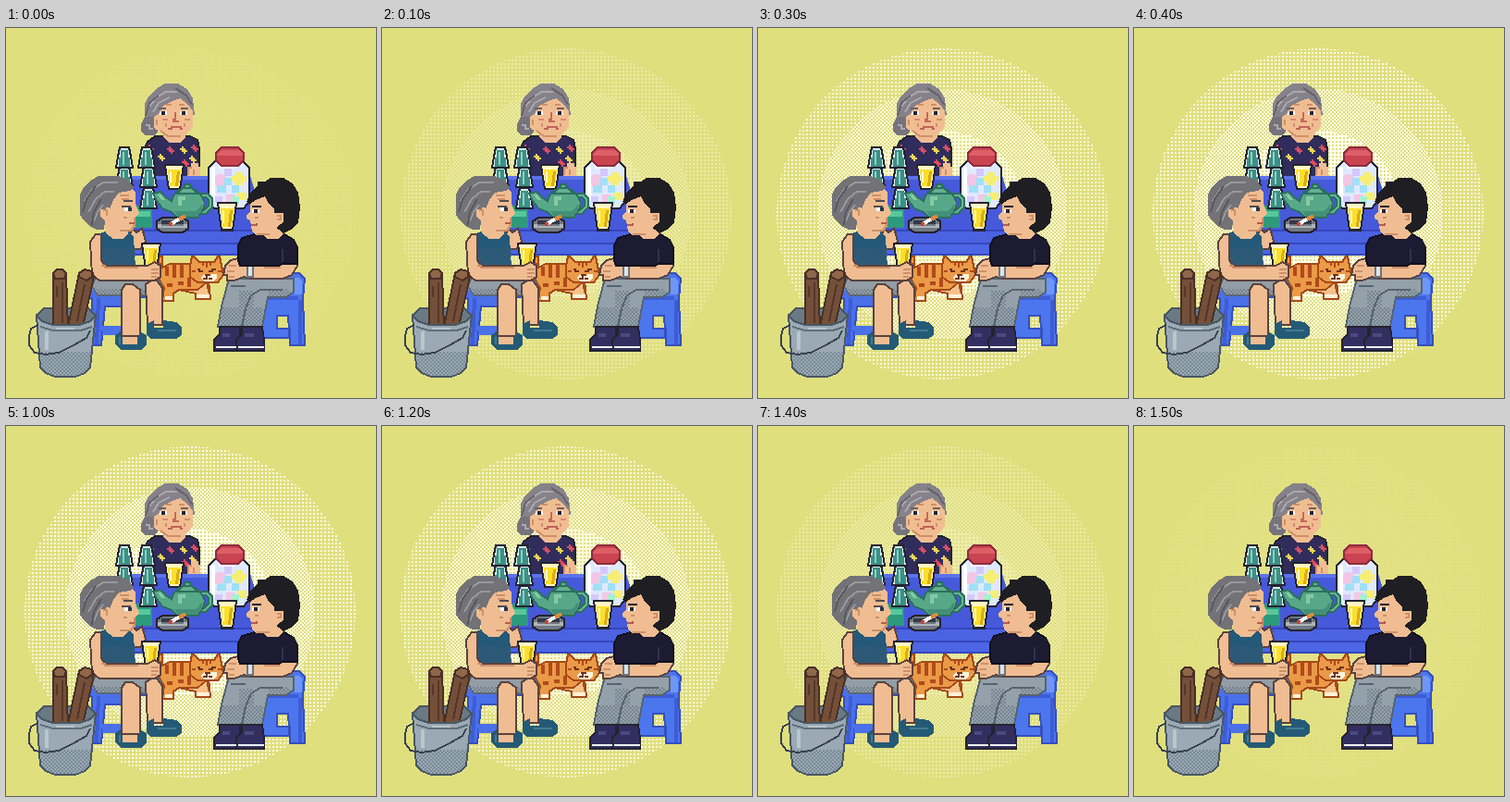
An HTML page without scripts for the animation above (1.6 s loop, 400 by 400 pixels).

```html
<!DOCTYPE html>
<html lang="en">
<head>
<meta charset="utf-8">
<title>Afternoon at the tea table</title>
<style>
html,body{margin:0;width:100%;height:100%;overflow:hidden;background:#e0df7e}
svg{display:block;width:100vw;height:100vh;shape-rendering:crispEdges}
.o{stroke:#25232f;stroke-width:2}
.l{fill:none;stroke-width:2}
.skin{fill:#f0bd92}
.limb{stroke:#5a4340;stroke-width:2}
.shade{stroke:#cf9069}
.glow{animation:glow 1.6s step-end infinite}
.nod{animation:nod 1.6s step-end infinite}
@keyframes glow{
0%{opacity:.1}6.25%{opacity:.4}12.5%{opacity:.7}18.75%{opacity:.85}
25%{opacity:1}75%{opacity:.85}81.25%{opacity:.7}87.5%{opacity:.4}93.75%,100%{opacity:.1}}
@keyframes nod{0%{transform:translateY(0)}62.5%,100%{transform:translateY(2px)}}
</style>
</head>
<body>
<svg viewBox="0 0 400 400">
<defs>
<pattern id="sparse" width="4" height="4" patternUnits="userSpaceOnUse"><path fill="#fffeea" d="M0 2h2v2h-2z"/></pattern>
<pattern id="check" width="4" height="4" patternUnits="userSpaceOnUse"><path fill="#fffeea" d="M0 2h2v2h-2zM2 0h2v2h-2z"/></pattern>
<pattern id="dense" width="4" height="4" patternUnits="userSpaceOnUse"><path fill="#fffeea" d="M0 0h4v2h-2v2h-2z"/></pattern>
<pattern id="dark" width="4" height="4" patternUnits="userSpaceOnUse"><path fill="#4b5c6c" fill-opacity=".4" d="M0 0h2v2h-2zM2 2h2v2h-2z"/></pattern>
<g id="beer">
  <path class="o" fill="#fff6c4" d="M1 1H21L19 15L17 27H5L3 15Z"/>
  <path fill="#fae02c" d="M4 6H18L16 24H6Z"/>
  <path fill="#dcab16" d="M14 8h3l-2 16h-3z"/>
  <path fill="#fff9c9" d="M6 8h2v12h-2z"/>
</g>
<g id="glass">
  <path class="o" fill="#d8f0ec" d="M5 1H15L17 11L19 23H1L3 11Z"/>
  <path fill="#3c8f85" d="M6 4h8v8h2v10h-12v-10h2z"/>
  <path fill="#8ccfc2" d="M8 6h2v14h-2z"/>
</g>
<path id="flower" d="M-2-4h2v2h2v2h2v2h-2v2h-2v-2h-2v-2h-2v-2h2z"/>
</defs>

<rect width="400" height="400" fill="#e0df7e"/>
<g class="glow">
  <circle cx="199" cy="201" r="179" fill="url(#sparse)"/>
  <circle cx="199" cy="201" r="135" fill="url(#check)"/>
  <circle cx="199" cy="201" r="90" fill="url(#dense)"/>
</g>

<!-- grandmother -->
<g class="nod">
  <path class="o" fill="#302d5c" d="M149 163V131L153 123L161 117H199L207 121L209 131V163Z"/>
  <path class="skin" d="M170 110h24v8l-6 6h-12l-6-6z"/>
  <g fill="#e04c62"><use href="#flower" x="178" y="132"/><use href="#flower" x="204" y="130"/><use href="#flower" x="156" y="130"/><use href="#flower" x="194" y="146"/></g>
  <g fill="#f2d45c"><use href="#flower" x="168" y="140"/><use href="#flower" x="192" y="132"/><use href="#flower" x="202" y="142"/></g>
  <path fill="#85828a" d="M150 100V82L154 74L162 66L172 60H186L196 66L202 76L204 94L165 104Z"/>
  <path fill="#76737c" d="M146 104L150 96H158L164 100V112L160 116H150L146 112Z"/>
  <path class="l" stroke="#aaa7ae" d="M155 85L163 75 173 69H185M159 91L165 81 177 75M151 105h4v4h4"/>
  <path class="l" stroke="#66636c" d="M151 95L155 81 165 73M183 65L195 73 201 83"/>
  <path class="skin" d="M160 96L166 92 170 84 182 78 188 76 196 82 202 90V106L198 112L190 118H174L166 112L160 108Z"/>
  <path class="l shade" d="M163 99v6M189 117H175L167 111M173 83h6M187 83h6"/>
  <path fill="#fff" d="M166 90h8v4h-8zM188 90h8v4h-8z"/>
  <path fill="#25232f" d="M168 90h4v4h-4zM190 90h4v4h-4z"/>
  <path class="l" stroke="#6d625f" d="M165 87h8M189 87h8"/>
  <path class="l" stroke="#c66a55" d="M183 91v8h-2v2h6"/>
  <path class="l" stroke="#dd8b70" d="M169 99h6M193 99h6M173 103v4M193 103v4"/>
  <path class="l" stroke="#c2605a" d="M175 109H179V107H189V109H191"/>
</g>

<!-- table -->
<path fill="#4659db" d="M128 160H264L284 220H128Z"/>
<path fill="#5b73ec" d="M128 160H264L266 164H128Z"/>
<path fill="#4b62e1" d="M124 220H286V232H124Z"/>
<path fill="#4c66e4" d="M136 232H270V246H136Z"/>
<path class="l" stroke="#3346bc" d="M128 219H284M136 233H270M136 245H262"/>
<path class="skin" d="M196 150h4v-4h8v4h2v10h-14z"/>
<path class="l shade" d="M197 159v-8h4M203 153v6"/>

<!-- glasses and tray -->
<path fill="#2d9a7c" d="M134 192H158V216H134Z"/>
<path fill="#58c79b" d="M138 198H156V204H138Z"/>
<use href="#glass" x="118" y="172"/><use href="#glass" x="144" y="172"/>
<use href="#glass" x="118" y="149"/><use href="#glass" x="144" y="149"/>
<use href="#glass" x="118" y="128"/><use href="#glass" x="142" y="128"/>
<use href="#beer" x="171" y="147"/>

<!-- jar -->
<path class="o" fill="#dfe9ff" d="M227 143H255L263 151V187L257 195H225L219 187V151Z"/>
<g>
  <path fill="#f4c6e6" d="M224 162l4-4h6l4 4v6l-4 4h-6l-4-4zM238 180h10v8h-10z"/>
  <path fill="#f7ee74" d="M248 156h8v4h4v6h-4v4h-8v-4h-4v-6h4zM250 178h10v8h-10z"/>
  <path fill="#a0e0f6" d="M236 162h8v8h-8zM228 172l4-2h6v8h-10zM244 170h8v8h-8z"/>
  <path fill="#a8efd0" d="M244 182h8v8h-8z"/>
  <path fill="#d3c8fa" d="M236 152h8v8h-8zM226 182h8v6h-8z"/>
  <path fill="#fff" d="M222 150h4v36h-4zM230 148h18v4h-18z"/>
</g>
<path fill="#c94450" stroke="#8e2b40" stroke-width="2" d="M233 129H251L257 135V143L251 149H233L227 143V135Z"/>
<path fill="#dd5f66" d="M232 132h20l4 4v2h-28v-2z"/>

<!-- teapot -->
<path class="l" stroke="#2c6f60" style="stroke-width:6" d="M209 181h8l4 4v8l-6 6h-6"/>
<path class="l" stroke="#65b591" d="M209 181h8l4 4v8l-6 6h-6"/>
<path fill="#57a888" stroke="#2c6f60" stroke-width="2" d="M159 179L167 177L173 183L179 187L181 181L187 175H205L211 181L215 189L213 197L207 205H185L179 199L169 195L163 187Z"/>
<path fill="#86caa4" d="M186 182h8v4h-4v6h-4zM164 180h4l4 6h-4z"/>
<path fill="#438f78" d="M182 198h24l6-8v6l-6 8h-20z"/>
<path fill="#64b08f" stroke="#2c6f60" stroke-width="2" d="M185 179L191 173H201L207 179ZM193 173v-4h6v4z"/>

<!-- ashtray -->
<path class="o" fill="#717983" d="M163 209L169 205H191L197 209V217L191 221H169L163 217Z"/>
<path fill="#353946" d="M168 208h24v4h-24z"/>
<path fill="#adb4ba" d="M164 212h4v2h24v-2h4v4h-32z"/>
<path class="l" stroke="#fff" style="stroke-width:4" d="M178 212L188 206"/>
<path class="l" stroke="#e48a3a" style="stroke-width:4" d="M187 207L194 203"/>
<path fill="#c9442f" d="M176 210h4v4h-4z"/>
<use href="#beer" transform="translate(228 188) scale(1 1.13)"/>

<!-- cat -->
<g fill="#eb9a48" stroke="#a54a18" stroke-width="2">
  <path d="M165 265V247H169V259L177 255H203L219 273L221 293H209V283H187L181 287V295H169L171 281 167 275Z"/>
  <path fill="#f5c28a" d="M187 283H207L217 275 221 293H205V287Z"/>
  <path d="M199 269V257L201 247H203L209 253H225L229 247H231L233 257 235 267 229 275H207Z"/>
</g>
<path fill="#fff3d9" d="M214 266h14v4l-4 4h-10l-4-4zM172 290h8v4h-8zM206 288h14v4h-14z"/>
<path class="l" stroke="#b04a1a" style="stroke-width:4" d="M174 258v10M182 256v14M190 256v14M198 270v10M174 278h6M186 276h6"/>
<path class="l" stroke="#b04a1a" d="M213 253v4M217 253v6M221 253v4M201 263h4M229 263h4M165 255h4"/>
<path class="l" stroke="#70331b" d="M207 261h2v2h4M219 263h4v-2h4M215 267h6M217 267v4h-4M219 271h4"/>

<!-- left stool -->
<path fill="#4a70ea" stroke="#3550bd" stroke-width="2" d="M87 277L95 269H151L157 291H127V301H107L103 343H91L93 293 85 287Z"/>
<path fill="#6f97fa" d="M88 278L96 272H108V284H92Z"/>
<path fill="#4a70ea" d="M104 322h22v10h-22z"/>
<path fill="#3d5cd6" d="M98 292h4l-2 50h-4z"/>

<!-- woman on the left -->
<path fill="#929da5" stroke="#5f6b76" stroke-width="2" d="M97 269H157L167 275 169 289H99L93 279Z"/>
<path fill="url(#dark)" d="M98 282H150V290H98Z"/>
<g class="skin limb">
  <path d="M151 277L157 273H163L169 281V321H153Z"/>
  <path d="M125 283L129 277H137L145 283V333H125Z"/>
</g>
<path fill="#255a76" d="M152 320L160 316V324H170V316L184 318 190 324V332L184 336H156L152 332Z"/>
<path fill="#255a76" d="M118 332L124 328V334H144V328L152 332V342L146 348H124L118 342Z"/>
<path class="skin" d="M126 334h16v8h-16z"/>
<path fill="#3f7d90" d="M122 334h2v8h-2zM164 326h20v2h-20z"/>
<path class="skin limb" d="M131 239L133 225 137 217 141 221 147 217 149 223 151 231 145 239Z"/>
<path fill="#24597a" d="M102 222L112 218H130L138 226 140 260H104Z"/>
<path fill="url(#dark)" d="M104 238H140V258H104Z"/>
<path class="skin" d="M108 212h24v10l-6 6h-10l-8-6z"/>
<use href="#beer" x="146" y="232"/>
<path class="skin limb" d="M91 231L97 223H103V251L107 257H153L161 253 167 257V269L161 273H101L93 267Z"/>
<path class="l shade" d="M103 257h4v2h36M157 261h8M157 265h8M157 269h6"/>
<g class="nod">
  <path class="skin" d="M100 196L112 178 134 172 140 178V190L144 200 140 204V214L136 220H122L108 218Z"/>
  <path fill="#737277" d="M80 202V180L84 172 90 166 100 160H122L132 164 138 172 134 176 122 178 116 186 112 196 108 200 106 218H98L90 214 84 208Z"/>
  <path class="l shade" d="M139 205V213L135 219H123M123 181h10M125 185h8M127 205h4"/>
  <path class="l" stroke="#98979c" d="M85 187L93 175 105 167H121M89 199L97 185 107 177H117M95 209L99 199 105 191"/>
  <path class="l" stroke="#59585e" d="M83 199L87 185 97 171M93 213L95 199 103 185"/>
  <path class="skin" d="M102 196h6v-2h4v14h-6l-4-4z"/>
  <path class="l shade" d="M105 197h4v6"/>
  <path fill="#fff" d="M128 194h4v4h-4z"/>
  <path fill="#26344a" d="M132 194h4v4h-4z"/>
  <path class="l" stroke="#534c50" d="M125 193h10M127 187h10"/>
  <path class="l" stroke="#b75b50" d="M133 211h6"/>
</g>

<!-- right stool -->
<path fill="#4c76ee" stroke="#3550bd" stroke-width="2" d="M279 271L285 265H317L323 271 321 293 323 343H307L305 311H293V325H307V335H275V289Z"/>
<path fill="#6f97fa" d="M284 270h32l4 4v14h-8v-10h-28z"/>
<path fill="#3d5cd6" d="M278 290h38v4h-38zM316 294h4v48h-4z"/>

<!-- man -->
<path fill="#94a1aa" stroke="#56646f" stroke-width="2" d="M241 271H311V285L303 291H283L277 323H229L233 301Z"/>
<path fill="url(#dark)" d="M232 302H278V322H232ZM252 284H268V302H252ZM284 282H306V290H284Z"/>
<path class="l" stroke="#56646f" d="M255 323L259 303 265 289 275 283H299M243 279h16"/>
<path class="o" fill="#322f60" d="M225 349V337L231 331V323H253V349Z"/>
<path class="o" fill="#322f60" d="M249 349V337L255 331V323H277L279 337V349Z"/>
<path class="l" stroke="#eef1f4" d="M227 345h22M251 345h28"/>
<path fill="#4a4a80" d="M234 330h8v4h-8zM258 330h10v4h-10z"/>
<path class="skin limb" d="M237 257L243 251 251 249 257 255H299L301 249H315V257L309 267 299 271H265L257 269 247 273H239V267H235Z"/>
<path class="l shade" d="M241 257h8M239 263h8M241 269h6M279 259h18"/>
<path fill="#dbe3e7" stroke="#69757f" stroke-width="2" d="M261 257h6v12h-6z"/>
<path fill="#1d1b32" stroke="#12111f" stroke-width="2" d="M251 251V235L255 227 269 223H301L311 229 315 237V255H299L295 257H253Z"/>
<path class="l" stroke="#33324c" d="M299 239v14"/>
<path class="skin" d="M276 212h24v10l-6 6h-12l-6-6z"/>
<path fill="#1f1e22" d="M260 188L264 178 272 170V166H280L286 162H300L310 168 316 178 318 194 316 210 308 218 300 222 290 214 270 196Z"/>
<path class="skin" d="M264 190L270 186 280 182 284 190 290 196V200H300V210L294 214 288 224H270L266 220 264 208 260 206V202L264 198Z"/>
<path class="l shade" d="M271 223H285M293 203h4v4h-4M273 205h-4"/>
<path fill="#fff" d="M266 196h8v4h-8z"/>
<path fill="#25232f" d="M268 196h4v4h-4zM266 192h10v2h-10z"/>
<path class="l" stroke="#b75b50" d="M265 213h6v-2"/>

<!-- bucket -->
<path fill="#6a7a85" stroke="#4a5864" stroke-width="2" d="M33 311L41 303H89L97 311 93 321H37Z"/>
<g stroke="#4a3026" stroke-width="2">
  <path fill="#74503a" d="M51 265L55 261H61L65 265L67 325H51Z"/>
  <path fill="#74503a" d="M79 265L85 261 93 263 95 269 83 323H67Z"/>
  <path fill="#8f674a" d="M51 265L55 261H61L65 265 63 271H53ZM79 265L85 261 93 263V269L87 273 79 269Z"/>
</g>
<path class="l" stroke="#563628" d="M61 275v44M55 279v12M85 277L77 317"/>
<path fill="#9aa9b3" stroke="#4a5864" stroke-width="2" d="M33 311L39 317 51 321H79L91 317 97 311 95 329 91 367 85 373 75 377H53L43 373 37 367Z"/>
<path fill="url(#dark)" d="M38 350H92L90 366L84 372L74 376H54L42 372L38 366Z"/>
<path fill="#b9c6cd" d="M42 328h4v20h-4zM54 324h20v2h-20z"/>
<path class="l" stroke="#5f707c" d="M37 323L51 327H81L93 323"/>
<path class="l" stroke="#39424e" d="M35 321L27 325 25 333V343L31 351 43 353 57 351 73 343 87 335 91 327"/>
</svg>
</body>
</html>
```
